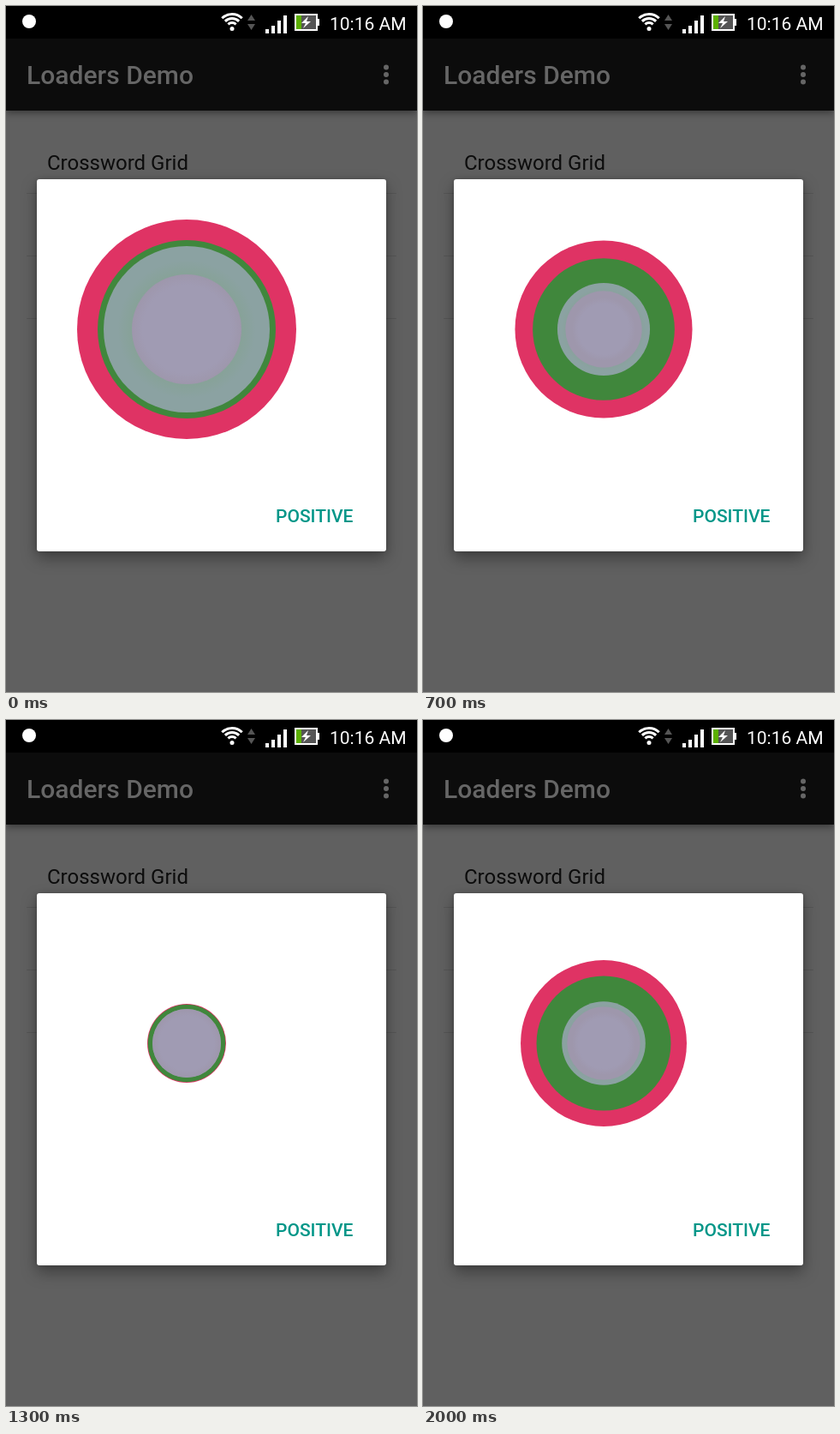
Write an HTML page that moves like this. It is 480x800 px and loops after 2100 ms.

```html
<!DOCTYPE html>
<html lang="en">
<head>
<meta charset="utf-8">
<title>Loader dialog</title>
<style>
  html, body { margin: 0; width: 100%; height: 100%; overflow: hidden; background: #606060; }
  svg { display: block; width: 480px; height: 800px; }
  text { font-family: Roboto, sans-serif; }
  .medium { font-weight: 500; }
  .bar { filter: drop-shadow(0 3px 4px rgba(0, 0, 0, .4)); }
  .dialog { filter: drop-shadow(0 8px 9px rgba(0, 0, 0, .3)) drop-shadow(0 0 3px rgba(0, 0, 0, .2)); }
</style>
</head>
<body>
<svg viewBox="0 0 480 800">
  <defs>
    <radialGradient id="haloFill">
      <stop offset=".75" stop-color="#86a296"/>
      <stop offset="1" stop-color="#86a296" stop-opacity="0"/>
    </radialGradient>
    <radialGradient id="coreFill">
      <stop offset=".8" stop-color="#a09bb3"/>
      <stop offset="1" stop-color="#a09bb3" stop-opacity="0"/>
    </radialGradient>
  </defs>

  <rect width="480" height="800" fill="#606060"/>
  <path d="M24 218.5H456M24 291.5H456M24 364.5H456" stroke="#565656"/>
  <text x="48" y="191" font-size="24" fill="#0c0c0c">Crossword Grid</text>

  <rect class="bar" y="38" width="480" height="84" fill="#0c0c0c"/>
  <text class="medium" x="24" y="91" font-size="30" fill="#666">Loaders Demo</text>
  <g fill="#666">
    <circle cx="444" cy="71.5" r="3"/>
    <circle cx="444" cy="80" r="3"/>
    <circle cx="444" cy="88.5" r="3"/>
  </g>

  <!-- Status bar -->
  <rect width="480" height="38"/>
  <circle cx="27" cy="18" r="8" fill="#fff"/>
  <g fill="none" stroke="#fff" stroke-width="3">
    <path d="M252.3 14.3A16.5 16.5 0 0 1 275.7 14.3M255.9 17.9A11.5 11.5 0 0 1 272.1 17.9M259.4 21.4A6.5 6.5 0 0 1 268.6 21.4"/>
  </g>
  <circle cx="264" cy="26.5" r="2.5" fill="#fff"/>
  <path d="M282 17L286.5 10L291 17ZM282 21H291L286.5 28Z" fill="#555"/>
  <path d="M303 27h4v5h-4zM310 23h4v9h-4zM317 17h4v15h-4zM324 11h4v21h-4z" fill="#fff"/>
  <rect x="338" y="10" width="25" height="18" fill="#555" stroke="#fff" stroke-width="2"/>
  <rect x="339" y="11" width="6" height="16" fill="#5cb000"/>
  <path d="M364 15h2v8h-2zM353 12L345 20H350L347 26L356 18H351Z" fill="#fff"/>
  <text x="378" y="27.5" font-size="21" fill="#fff">10:16 AM</text>

  <rect class="dialog" x="36" y="202" width="408" height="434" rx="3" fill="#fff"/>
  <text class="medium" x="315" y="602" font-size="21" fill="#009688">POSITIVE</text>

  <g transform="translate(211 377)">
    <circle id="red" fill="#df3364"/>
    <circle id="green" fill="#40873c"/>
    <circle id="teal" fill="#8ba2a2"/>
    <circle id="halo" fill="url(#haloFill)"/>
    <circle id="mauve" fill="#9e97ac"/>
    <circle id="core" fill="url(#coreFill)"/>
  </g>
</svg>
<script>
  const LOOP = 2100, STEP = 100, TURN = 1300;
  const setRadius = (id, r) => document.getElementById(id).setAttribute('r', r);

  // Pulse phase: 0 is fully contracted, 1 fully expanded.
  function phase(ms) {
    if (ms < TURN) return 1 - ms / 1980;
    const s = (ms - TURN) / 1000;
    return .168 + .775 * s - .235 * s * s;
  }

  function draw(now) {
    const ms = Math.floor(now % LOOP / STEP) * STEP;
    const e = (1 - Math.cos(Math.PI * phase(ms))) / 2;
    const teal = 40 + 57 * e ** 4.3;
    const mauve = 40 + 24 * e ** 5;
    setRadius('red', 40 + 88 * e);
    setRadius('green', 41 + 63 * (e - .55 * e ** 3 * (1 - e)));
    setRadius('teal', teal);
    setRadius('halo', (teal + mauve) / 2);
    setRadius('mauve', mauve);
    setRadius('core', 40 - 5 * e + 29 * e ** 12);
  }

  const start = performance.now();
  function tick() {
    draw(performance.now() - start);
    requestAnimationFrame(tick);
  }
  tick();
</script>
</body>
</html>
```
